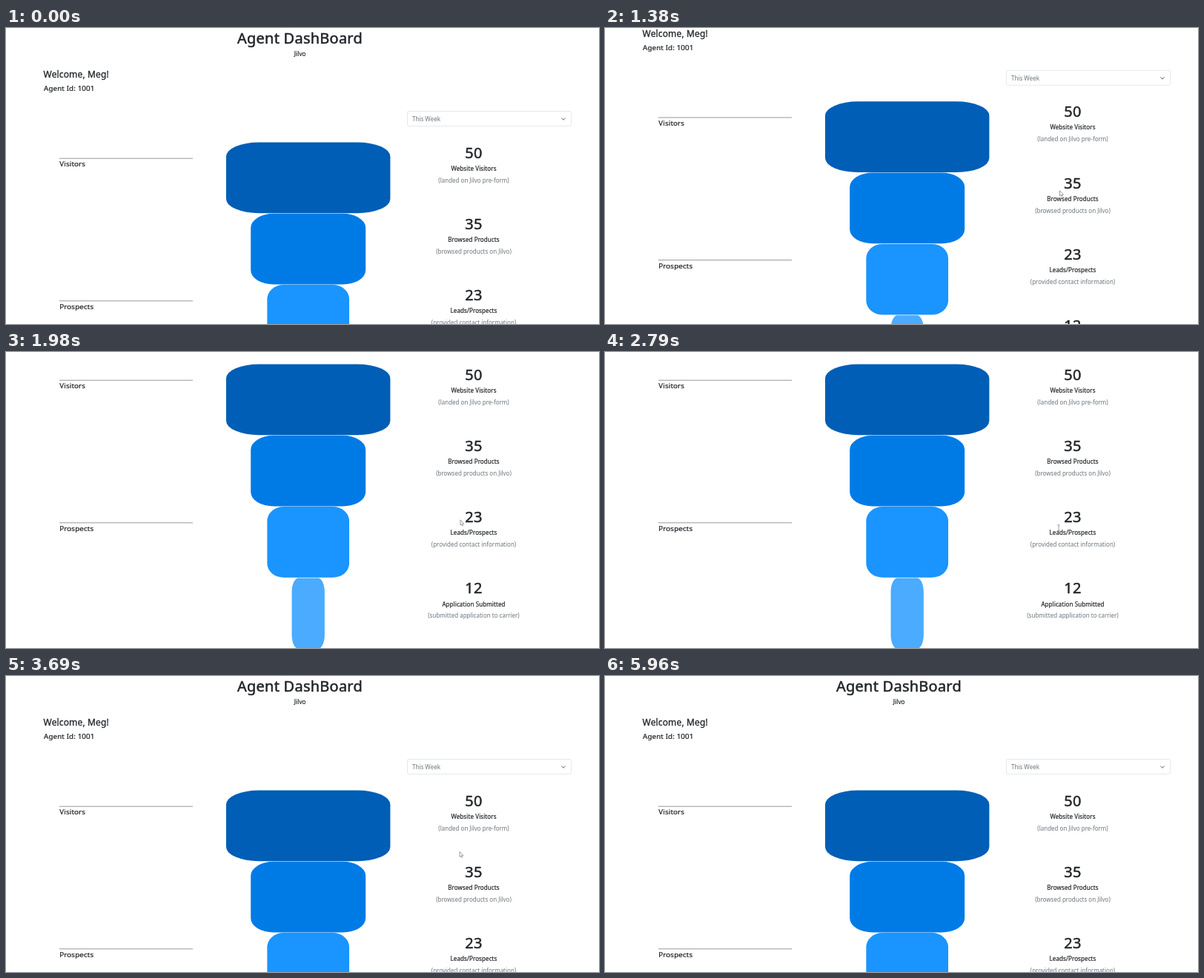
An HTML page that plays this animation: 800x400 px, repeating every 6.36 s.

```html
<!DOCTYPE html>
<html lang="en">
<head>
<meta charset="utf-8">
<title>Agent DashBoard</title>
<style>
  html, body { margin: 0; width: 100%; height: 100%; overflow: hidden; background: #fff; }
  svg { display: block; width: 800px; height: 400px; }
  text { font: 8px "Noto Sans", "Open Sans", sans-serif; fill: #212529; }
  /* Medium weight, drawn from the regular cut */
  .medium { stroke: #212529; stroke-width: .025em; letter-spacing: .012em; }
  .h1 { font-size: 20px; }
  .h4 { font-size: 12px; }
  .h5 { font-size: 9.8px; }
  .note { fill: #6c757d; }
  .middle { text-anchor: middle; }
</style>
</head>
<body>
<svg viewBox="0 0 800 400">
  <g id="page">
    <text class="h1 medium middle" x="396.5" y="20.5">Agent DashBoard</text>
    <text class="medium middle" x="396.7" y="38.2">Jilvo</text>
    <text class="h4 medium" x="50.6" y="67.4">Welcome, Meg!</text>
    <text class="h5 medium" x="51" y="85">Agent Id: 1001</text>
    <rect x="541.5" y="112.5" width="221" height="20" rx="1.8" fill="#fff" stroke="#e6e9ec"/>
    <text class="note" x="548" y="126.2">This Week</text>
    <path d="M749.4 121.7l2.6 2.6l2.6-2.6" fill="none" stroke="#555b61"/>
  </g>
  <g id="cursor">
    <path id="arrow" d="M0 0V7L1.6 5.6L2.7 8L3.8 7.5L2.8 5.2H4.9Z" fill="#fff" stroke="#777" stroke-width=".7"/>
    <path id="beam" d="M-1.7-3.5H1.7M0-3.5V4M-1.7 4H1.7" fill="none" stroke="#888" stroke-width=".8"/>
  </g>
</svg>
<script>
const LOOP = 6360, TICK = 69.5, ROW = 96.3, DEPTH = 138;
const byId = id => document.getElementById(id);
const page = byId('page'), cursor = byId('cursor'), arrow = byId('arrow'), beam = byId('beam');

function add(tag, attrs, content = '') {
  const node = document.createElementNS('http://www.w3.org/2000/svg', tag);
  for (const name in attrs) node.setAttribute(name, attrs[name]);
  node.textContent = content;
  page.append(node);
}

const funnel = [
  { share: 1, color: '#005eb6', count: 50, label: 'Website Visitors', note: '(landed on Jilvo pre-form)', stage: 'Visitors' },
  { share: .7, color: '#007be6', count: 35, label: 'Browsed Products', note: '(browsed products on Jilvo)' },
  { share: .5, color: '#1a94ff', count: 23, label: 'Leads/Prospects', note: '(provided contact information)', stage: 'Prospects' },
  { share: .2, color: '#4aabff', count: 12, label: 'Application Submitted', note: '(submitted application to carrier)' }
];

funnel.forEach((item, i) => {
  const top = 154.5 + i * ROW, height = 95.7, width = 221.4 * item.share;
  add('rect', { x: 407.7 - width / 2, y: top, width, height, rx: width * .2, ry: height * .2, fill: item.color });
  add('text', { class: 'h1 medium middle', x: 631, y: top + 21 }, item.count);
  add('text', { class: 'medium middle', x: 631, y: top + 38.2 }, item.label);
  add('text', { class: 'note middle', x: 631, y: top + 54 }, item.note);
  if (item.stage) {
    add('rect', { x: 72, y: top + 21.2, width: 180, height: 1, fill: '#999' });
    add('text', { class: 'h5 medium', x: 72.3, y: top + 32.7 }, item.stage);
  }
});

// Pointer path: each leg heads for x, y
const entry = { x: 790, y: 405 };
const legs = [
  { start: 330, end: 1090, x: 613.5, y: 219.8 },
  { start: 1780, end: 2390, x: 612, y: 237.4 },
  { start: 3690, end: 4310, x: 697, y: 306 },
  { start: 4640, end: 5210, x: 680, y: 285 },
  { start: 5540, end: 5960, x: 765, y: 400 }
];

// Progress from start to end, advancing once per tick; power > 1 slows towards the end
function progress(t, start, end, power = 1) {
  const elapsed = Math.floor((t - start) / TICK + .05) * TICK;
  const p = Math.min(1, Math.max(0, elapsed / (end - start)));
  return 1 - (1 - p) ** power;
}

function pointerAt(t) {
  let { x, y } = entry;
  for (const leg of legs) {
    const p = progress(t, leg.start, leg.end, 2);
    x += (leg.x - x) * p;
    y += (leg.y - y) * p;
  }
  return { x, y };
}

function draw() {
  const t = performance.now() % LOOP;
  const scroll = DEPTH * (progress(t, 1090, 1785) - progress(t, 2790, 3430, 1.33));
  const { x, y } = pointerAt(t);
  const overText = t >= 2390 && scroll > 10;
  page.setAttribute('transform', `translate(0 ${-scroll})`);
  cursor.setAttribute('transform', `translate(${x} ${y})`);
  cursor.style.display = t >= 330 && t < 5950 ? '' : 'none';
  arrow.style.display = overText ? 'none' : '';
  beam.style.display = overText ? '' : 'none';
  requestAnimationFrame(draw);
}
draw();
</script>
</body>
</html>
```
